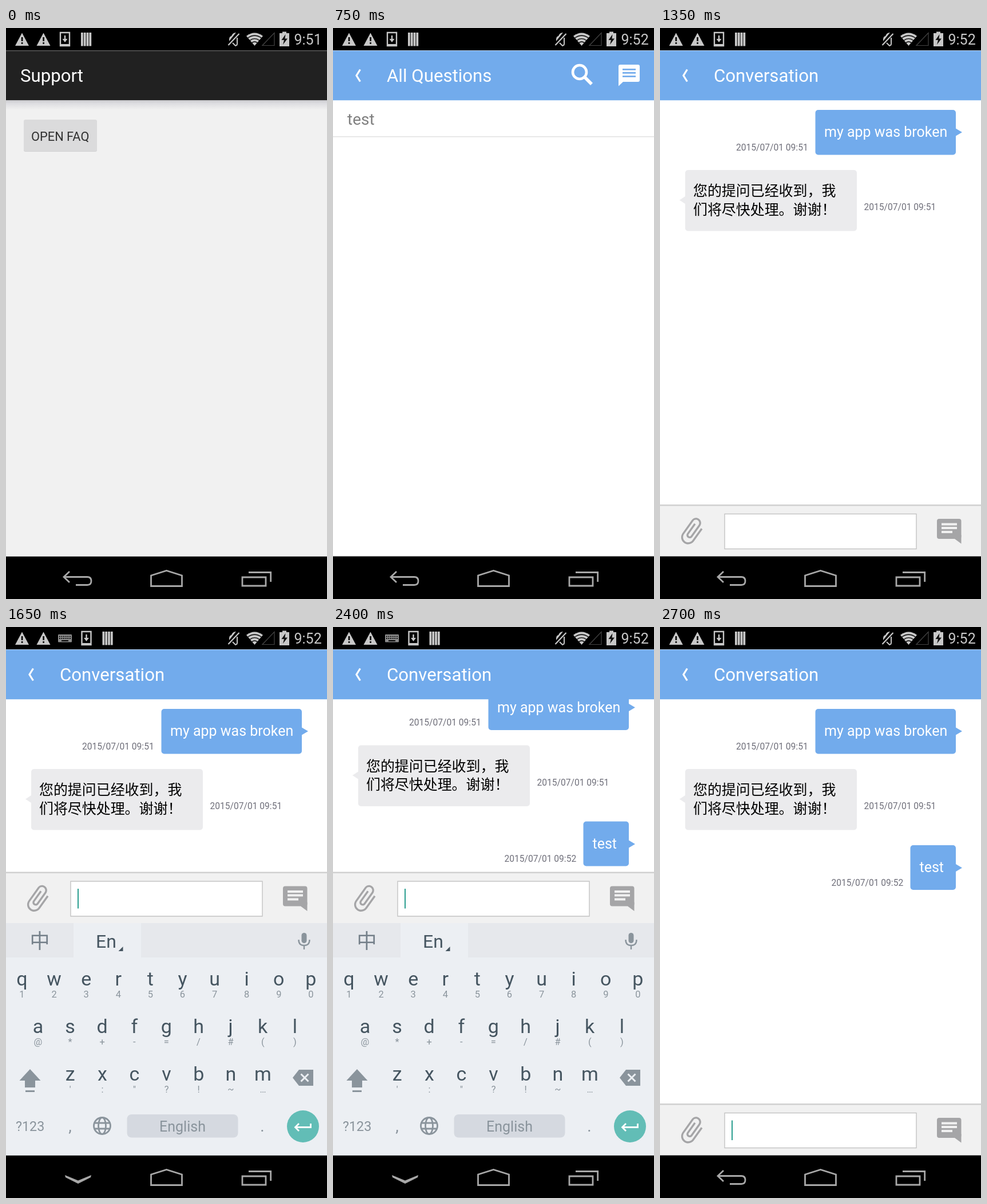
These frames come from a looping animation (561x997 px, 3000 ms). An HTML page with a canvas:

```html
<!DOCTYPE html>
<html lang="en">
<head>
<meta charset="utf-8">
<title>Support chat</title>
<style>
html, body { margin: 0; height: 100%; overflow: hidden; background: #000; }
canvas { display: block; }
</style>
</head>
<body>
<canvas id="stage" width="561" height="997"></canvas>
<script>
const ctx = document.getElementById('stage').getContext('2d');
const BLUE = '#72abec', ICON = '#c8c8c8', GREY = '#a5a5a7', KEY = '#455560', HINT = '#8a949c', PANEL = '#eceff3';
const LOOP = 3000, PITCH = 56.1;

function rect(x, y, w, h, color, r = 0) {
  ctx.fillStyle = color;
  ctx.beginPath();
  ctx.roundRect(x, y, w, h, r);
  ctx.fill();
}
function text(s, x, y, size, color, align = 'left', weight = 400, family = 'Roboto') {
  ctx.font = `${weight} ${size}px "${family}", sans-serif`;
  ctx.textAlign = align;
  ctx.fillStyle = color;
  ctx.fillText(s, x, y);
}
function fill(d, color) {
  ctx.fillStyle = color;
  ctx.fill(new Path2D(d));
}
function stroke(d, color, width) {
  ctx.strokeStyle = color;
  ctx.lineWidth = width;
  ctx.stroke(new Path2D(d));
}
function at(x, y, draw) {
  ctx.save();
  ctx.translate(x, y);
  draw();
  ctx.restore();
}

function statusBar(clock, typing) {
  rect(0, 0, 561, 39, '#000');
  for (const x of [16, 53.5]) {
    fill(`M${x} 31L${x + 12} 8.5L${x + 24} 31Z`, ICON);
    rect(x + 10.8, 16, 2.6, 7, '#000');
    rect(x + 10.8, 25, 2.6, 2.8, '#000');
  }
  if (typing) {
    rect(91, 13, 24, 13.5, '#8c8c8c', 1);
    for (let i = 0; i < 6; i++) {
      rect(93 + i * 3.6, 15.5, 1.8, 2, '#000');
      rect(93 + i * 3.6, 19, 1.8, 2, '#000');
    }
    rect(97, 23, 12, 2, '#000');
  }
  at(typing ? 37.5 : 0, 0, () => {
    stroke('M95 8H111V31H95Z', ICON, 2.4);
    rect(95, 28, 16, 3, ICON);
    stroke('M103 13V22', ICON, 2.4);
    fill('M98.5 19H107.5L103 25Z', ICON);
    for (let i = 0; i < 4; i++) rect(131 + i * 4.8, 8, 3.8, 23.5, ICON);
  });
  // Muted ringer, wifi, empty signal, charging battery
  fill('M390 20Q390 15 394 14Q396 8 402 8L390 23Z', ICON);
  stroke('M388.5 30L407.5 10', ICON, 2.2);
  stroke('M396 26L401 31Q405 30 404 25V17', ICON, 2);
  fill('M420 14Q434.5 3 449 14L434.5 31Z', ICON);
  stroke('M422.5 17.5Q434.5 9 446.5 17.5M426 21.8Q434.5 15.5 443 21.8M429.5 26Q434.5 22 439.5 26', '#000', 1.3);
  stroke('M448 30.5H469V8.5Z', '#444', 1.2);
  fill('M478 9H483V6.5H490V9H495V32H478Z', ICON);
  fill('M488.5 11L481.5 21H486L484 29L492 18.5H487.5Z', '#111');
  text(clock, 503.5, 29, 25, ICON);
}

function navBar(typing) {
  rect(0, 922.5, 561, 75, '#000');
  if (typing) fill('M103 957L126 966.5L149 957L148 961L126 972L104 961Z', '#a8a8a8');
  else stroke('M111 949L101 958.5L111 968M101 958.5H142Q149 958.5 149 965.5Q149 972.5 142 972.5H122', '#a8a8a8', 2.8);
  stroke('M253.5 974.5V956L280.5 947.5L307.5 956V974.5Z', '#a8a8a8', 2.8);
  stroke('M413 959H454V974H413ZM424 950.5H462.7V967', '#a8a8a8', 2.8);
}

function header(title, search, chat) {
  rect(0, 39.5, 561, 86.7, BLUE);
  stroke('M47.5 72.5L41 83L47.5 93.5', '#fff', 3.2);
  text(title, 94, 94, 31.2, '#fff');
  if (search) {
    stroke('M443 77A12 12 0 1 0 419 77A12 12 0 1 0 443 77', '#fff', 4.6);
    stroke('M439.5 85.5L452 98', '#fff', 5.6);
  }
  if (chat) {
    rect(499, 64, 37, 30, '#fff', 3);
    fill('M499 88V101.5L508 93Z', '#fff');
    for (const y of [71, 77, 83.2]) rect(506, y, 23, 2.7, BLUE);
  }
}

function bubble(x, y, w, h, color, tipX, tipY) {
  rect(x, y, w, h, color, 5);
  const edge = tipX < x ? x : x + w;
  fill(`M${edge} ${tipY - 6.5}L${tipX} ${tipY}L${edge} ${tipY + 6.5}Z`, color);
}
function stamp(time, x, y) {
  text('2015/07/01 ' + time, x, y, 15.6, '#6f6f7a');
}
function messages(scroll, reply) {
  ctx.save();
  ctx.beginPath();
  ctx.rect(0, 126, 561, 796);
  ctx.clip();
  ctx.translate(0, -scroll);
  bubble(271.5, 143, 245.5, 78.5, BLUE, 528, 182);
  text('my app was broken', 287, 190, 25, '#fff');
  stamp('09:51', 133, 213.5);
  bubble(44, 248, 300, 106.5, '#ebebed', 34, 300.5);
  ['您的提问已经收到，我', '们将尽快处理。谢谢！'].forEach((line, i) =>
    text(line, 58, 293 + i * 32.5, 24.94, '#000', 'left', 400, 'Noto Sans CJK SC'));
  stamp('09:51', 356.5, 318);
  if (reply) {
    bubble(437.5, 381, 79.5, 78, BLUE, 528, 420.5);
    text('test', 453.5, 428, 25, '#fff');
    if (reply === 'sent') stamp('09:52', 299.5, 451.5);
    else stroke('M411 418A13 13 0 1 1 398 431', '#bbb', 3);
  }
  ctx.restore();
}

const CLIP = 'M16.5 6v11.5c0 2.21-1.79 4-4 4s-4-1.79-4-4V5c0-1.38 1.12-2.5 2.5-2.5s2.5 1.12 2.5 2.5v10.5c0 .55-.45 1-1 1s-1-.45-1-1V6H10v9.5c0 1.38 1.12 2.5 2.5 2.5s2.5-1.12 2.5-2.5V5c0-2.21-1.79-4-4-4S7 2.79 7 5v12.5c0 3.04 2.46 5.5 5.5 5.5s5.5-2.46 5.5-5.5V6z';

function inputBar(top, draft, cursor) {
  at(0, top, () => {
    rect(0, 0, 561, 89, '#f1f1f1');
    rect(0, -1, 561, 2.5, '#d0d0d0');
    at(56.5, 46, () => {
      ctx.rotate(0.62);
      ctx.scale(2.25, 2.25);
      ctx.translate(-12.5, -12);
      fill(CLIP, GREY);
    });
    rect(113, 15, 335, 61.5, '#fff');
    stroke('M113 15.5H448V76.5H113Z', '#c4c4c4', 1.4);
    rect(484, 24, 42.5, 35, GREY, 4);
    fill('M515 59L526.5 67.5V52Z', GREY);
    rect(492, 31.5, 27, 4, '#f1f1f1');
    rect(492, 38, 27, 4, '#f1f1f1');
    rect(492, 45, 19, 4, '#f1f1f1');
    text(draft, 125, 55, 28, '#222');
    if (cursor) {
      const x = draft ? 126 + ctx.measureText(draft).width : 125;
      rect(x, 28.5, 2, 34.5, '#2a9d8f');
    }
  });
}

const KEYS = [
  ['qwertyuiop', '1234567890', 28, 626],
  ['asdfghjkl', '@*+-=/#()', 56, 709],
  ['zxcvbnm', '\':"?!~…', 112.3, 791.5],
];
const WORDS = {
  t: ['t', 'to', 'the', 'that'],
  te: ['te', 'ten', 'tell', 'team'],
  test: ['test', 'tests', 'tested', 'testing'],
};

function keyboard(draft) {
  rect(0, 517, 561, 405.5, PANEL);
  rect(0, 517, 561, 60, '#e6e8ec');
  if (draft) {
    WORDS[draft].forEach((word, i) => text(word, [22, 125, 245, 380][i], 558, 28, KEY));
  } else {
    rect(118, 517, 118, 60, PANEL);
    text('中', 59, 561, 35, '#75808a', 'center', 300, 'Noto Sans CJK SC');
    text('En', 157, 560, 32, KEY);
    fill('M196.5 566H204.5V558Z', KEY);
    rect(516.5, 534, 9, 18, HINT, 4.5);
    stroke('M511.5 546Q511.5 556 521 556Q530.5 556 530.5 546M521 556V563', HINT, 2.4);
  }
  for (const [letters, hints, x, y] of KEYS) {
    [...letters].forEach((letter, i) => {
      text(letter, x + i * PITCH, y, 34, KEY, 'center');
      text(hints[i], x + i * PITCH, y + 21, 16.5, HINT, 'center');
    });
  }
  fill('M42 772L60.5 792H51V804H33V792H23.5ZM34 809H50V812H34Z', HINT);
  fill('M501 787L512 773H537V801H512Z', HINT);
  stroke('M515.5 780.5L528.5 793.5M528.5 780.5L515.5 793.5', PANEL, 3);
  text('?123', 17, 880, 23.3, HINT);
  text(',', 112, 881, 28, HINT, 'center');
  text('.', 448, 881, 28, HINT, 'center');
  stroke('M153.5 871A14.5 14.5 0 1 1 182.5 871A14.5 14.5 0 1 1 153.5 871M161.5 871A6.5 14.5 0 1 1 174.5 871A6.5 14.5 0 1 1 161.5 871M155 866H181M155 876H181', HINT, 2.8);
  rect(211.5, 851, 194, 40.5, '#d5d9e0', 8);
  text('English', 308.5, 881, 25, HINT, 'center');
  rect(491, 844, 56, 56, '#62bdb6', 28);
  stroke('M532.5 867V873.5H506M512 867L505.5 873.5L512 880', '#fff', 2.8);
}

function support() {
  rect(0, 126, 561, 796.5, '#f1f1f1');
  const shade = ctx.createLinearGradient(0, 126, 0, 143);
  shade.addColorStop(0, '#c8c8cb');
  shade.addColorStop(0.3, '#dcdce0');
  shade.addColorStop(1, '#f1f1f1');
  rect(0, 126, 561, 17, shade);
  rect(0, 39, 561, 87, '#212121');
  rect(0, 38.8, 561, 1.4, '#666');
  text('Support', 25, 94, 31.2, '#fff');
  rect(31, 161, 128, 55, '#d2d2d4', 3);
  rect(31, 160, 128, 55, '#dbdbdc', 3);
  text('OPEN FAQ', 44, 197, 21.8, '#303030');
}

function list(title, row, alpha = 1) {
  header(title, true, true);
  rect(0, 189, 561, 1.5, '#e2e2e2');
  ctx.globalAlpha = alpha;
  text(row, 25, 168.5, 28, '#808080');
  ctx.globalAlpha = 1;
}

function question() {
  header('Question', false, true);
  text('test', 25, 172, 31.2, '#555');
  text('test', 25, 246, 25, '#808080');
}

function chat({ scroll = 0, reply, top = 833, draft = '', cursor = false }) {
  messages(scroll, reply);
  header('Conversation');
  inputBar(top, draft, cursor);
}
function typing(draft, extra) {
  chat({ top: 428.5, draft, cursor: true, ...extra });
  keyboard(draft);
}
function closing() {
  chat({ top: 428.5, scroll: 41.5, reply: 'sent', cursor: true });
  ctx.globalAlpha = 0.5;
  at(0, 75, () => keyboard(''));
  ctx.globalAlpha = 1;
}

// Start time, drawing, keyboard shown
const SCENES = [
  [0, support],
  [300, () => header('FAQ', true, true)],
  [450, () => list('FAQ', 'All Questions', 0.5)],
  [600, () => list('FAQ', 'All Questions')],
  [750, () => list('All Questions', 'test')],
  [1050, question],
  [1200, () => { header('Conversation'); inputBar(833, '', false); }],
  [1350, () => chat({})],
  [1650, () => typing(''), true],
  [1800, () => typing('t'), true],
  [1950, () => typing('te'), true],
  [2100, () => typing('test'), true],
  [2250, () => typing('', { scroll: 41.5, reply: 'sending' }), true],
  [2400, () => typing('', { scroll: 41.5, reply: 'sent' }), true],
  [2550, closing],
  [2700, () => chat({ reply: 'sent', cursor: true })],
];

function frame() {
  const t = performance.now() % LOOP;
  const [, draw, keys] = SCENES.findLast(([start]) => t >= start);
  rect(0, 0, 561, 997, '#fff');
  navBar(keys);
  draw();
  statusBar(t < 150 ? '9:51' : '9:52', keys);
  requestAnimationFrame(frame);
}
frame();
</script>
</body>
</html>
```
